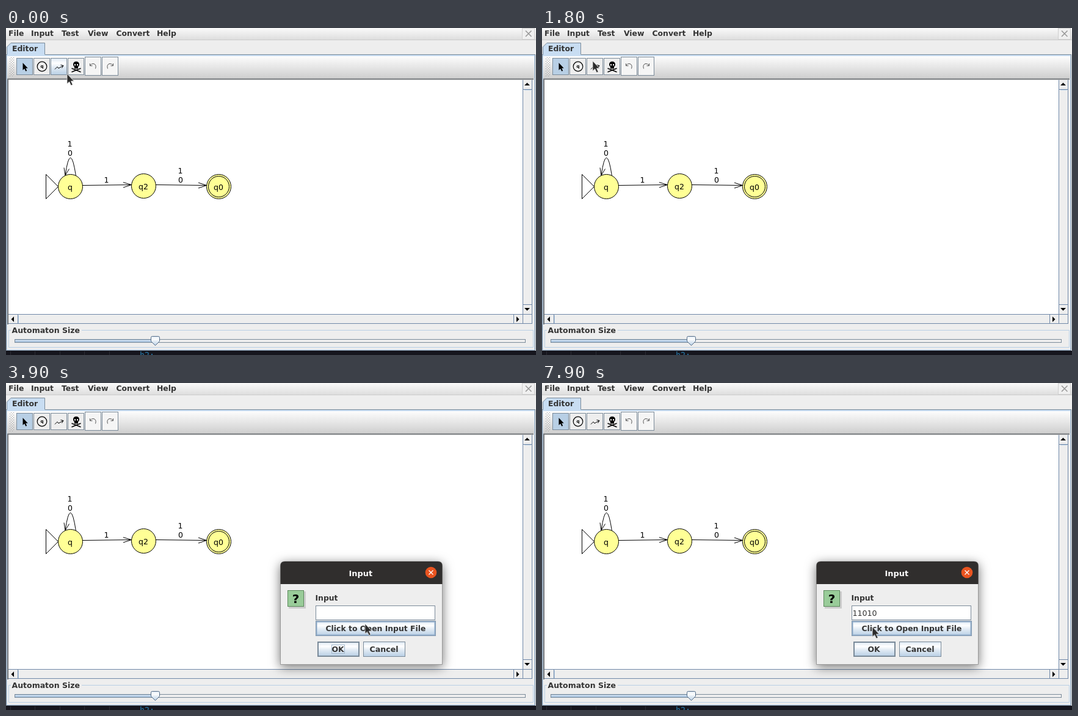
Recreate the animation shown at these times as an HTML page. Size 868 by 535 pixels, loop 8000 ms.

```html
<!DOCTYPE html>
<html lang="en">
<head>
<meta charset="utf-8">
<title>Automaton editor</title>
<style>
  html, body { margin: 0; width: 100%; height: 100%; overflow: hidden; background: #eee; }
  svg { display: block; width: 868px; height: 535px; }
  text { font: 12.5px "DejaVu Sans", sans-serif; fill: #000; white-space: pre; }
  .b text, text.b { font-weight: bold; font-size: 12.4px; fill: #333; }
  .dots text { font-size: 12.55px; }
  .key text { font-size: 10.15px; fill: #6382bf; }
  .mid text { text-anchor: middle; }
  .ln { fill: none; stroke: #000; }
  .edge { stroke: #7a8a99; }
  .scroll { fill: none; stroke: #7088a8; }
</style>
</head>
<body>
<svg viewBox="0 0 868 535" xmlns="http://www.w3.org/2000/svg">
  <defs>
    <linearGradient id="bar" x2="0" y2="1">
      <stop offset="0" stop-color="#fafafa"/><stop offset="1" stop-color="#dcdcdc"/>
    </linearGradient>
    <linearGradient id="tools" x2="0" y2="1">
      <stop offset="0" stop-color="#fdfdfd"/><stop offset="1" stop-color="#cfcfcf"/>
    </linearGradient>
    <linearGradient id="metal" x2="0" y2="1">
      <stop offset="0" stop-color="#dde8f3"/><stop offset=".3" stop-color="#fff"/>
      <stop offset=".55" stop-color="#e2ebf4"/><stop offset="1" stop-color="#b8cfe5"/>
    </linearGradient>
    <pattern id="grip" width="4" height="4" patternUnits="userSpaceOnUse">
      <path d="M0 0h1v1h-1zM2 2h1v1h-1z" fill="#999"/>
    </pattern>
    <path id="arrow" d="M0 0V16.300L3.700 12.900L6.500 19L9.200 17.800L6.500 11.900H11.300Z"/>
  </defs>

  <!-- menu bar and tab -->
  <rect width="868" height="535" fill="#eee"/>
  <rect width="868" height="20" fill="url(#bar)"/>
  <path d="M0 19.500H868" stroke="#ccc"/>
  <rect x="845.500" y=".5" width="20" height="18" fill="#f0f0f0" stroke="#d0d0d0"/>
  <path d="M851 4.500L860.500 14M860.500 4.500L851 14" stroke="#999" stroke-width="1.600"/>
  <rect id="menuOn" x="36" width="48" height="20" fill="#a3b8cc"/>
  <g class="b">
    <text x="4" y="13">File</text><text x="41" y="13">Input</text><text x="91" y="13">Test</text>
    <text x="134" y="13">View</text><text x="180.500" y="13">Convert</text><text x="247" y="13">Help</text>
  </g>
  <rect x=".5" y="43.500" width="866" height="484" fill="#c8ddf2" class="edge"/>
  <path d="M1.500 46V31L8 24.500H63.500V46Z" fill="#c8ddf2"/>
  <path d="M1.500 44V31L8 24.500H63.500V43" fill="none" class="edge"/>
  <text class="b" x="10" y="38">Editor</text>
  <rect x="2" y="46" width="863" height="480" fill="#eee"/>

  <!-- tool bar -->
  <rect x="2" y="46" width="863" height="36" fill="url(#tools)"/>
  <rect x="5" y="48" width="9" height="31" fill="url(#grip)"/>
  <g class="edge" fill="#eee">
    <rect x="17.500" y="49.500" width="26" height="27" fill="#b8cfe5"/>
    <rect x="45.500" y="49.500" width="26" height="27"/>
    <rect id="tool" x="73.500" y="49.500" width="26" height="27"/>
    <rect x="101.500" y="49.500" width="26" height="27"/>
    <rect x="129.500" y="47.500" width="26" height="30" fill="#f5f5f5"/>
    <rect x="157.500" y="47.500" width="26" height="30" fill="#f5f5f5"/>
  </g>
  <use href="#arrow" transform="translate(27.500 57) scale(.73)"/>
  <circle cx="59" cy="63" r="7.800" class="ln" stroke-width="1.200"/>
  <text x="59" y="65" text-anchor="middle" style="font-size:7px;font-weight:bold">q</text>
  <path d="M80 67.500L84 63.500L86 66L94 61.500M89.500 60.500L94 61.500L91.500 65.500" class="ln"/>
  <path d="M107.500 66L122.500 72M122.500 66L107.500 72" class="ln" stroke-width="1.500"/>
  <path d="M110 59.500a5 4.800 0 0 1 10 0q0 3 -2 4v3h-6v-3q-2 -1 -2 -4z"/>
  <path d="M112 59h2v2.500h-2zM116 59h2v2.500h-2z" fill="#eee"/>
  <g class="ln" style="stroke:#555">
    <path d="M137.500 61.500Q140 57.500 144 58.500Q148.500 60.500 146.500 66.500M137.500 58V61.800H141.500"/>
    <path d="M175.500 61.500Q173 57.500 169 58.500Q164.500 60.500 166.500 66.500M175.500 58V61.800H171.500"/>
  </g>

  <!-- drawing area with scroll bars -->
  <rect x="2" y="82" width="862" height="403" fill="#eee"/>
  <path d="M2 83.500H864M3 83V485" stroke="#6f7276" stroke-width="2"/>
  <rect x="4" y="85" width="842" height="383" fill="#fff"/>
  <g class="scroll">
    <path d="M846.500 85V468.500M861.500 85V484M847 100.500H861M847 452.500H861M847 468.500H861"/>
    <path d="M4 468.500H847M4 483.500H862M19.500 469V483M831.500 469V483M846.500 469V483"/>
  </g>
  <path d="M849 101.500H860M20.500 470V483" stroke="#b8cfe5"/>
  <path d="M849 94L853.500 89.500L858 94ZM849 458L853.500 462.500L858 458ZM13 472L8.500 476.500L13 481ZM836 472L840.500 476.500L836 481Z"/>

  <!-- automaton -->
  <g class="ln">
    <path d="M65.500 239.500L85.500 259.500L65.500 279.500Z"/>
    <path d="M114.500 242Q105.500 183 97 241M95 228.500L97 241L103.500 230.500"/>
    <path d="M125 257.500L205.500 256.500M192 252.500L205.500 256.500L192 261"/>
    <path d="M245 256.500L328.500 257.500M315 253L328.500 257.500L315 262"/>
  </g>
  <g fill="#ffff96" stroke="#000">
    <circle cx="105.500" cy="259.500" r="20"/><circle cx="225.500" cy="258.500" r="20"/>
    <circle cx="348.500" cy="259.500" r="20"/><circle cx="348.500" cy="259.500" r="17"/>
  </g>
  <g class="mid">
    <text x="105" y="265">q</text><text x="225" y="264">q2</text><text x="348" y="265">q0</text>
    <text x="104.500" y="194">1</text><text x="105" y="209">0</text><text x="164.500" y="253">1</text>
    <text x="285.500" y="238">1</text><text x="286" y="253">0</text>
  </g>

  <!-- size slider -->
  <path d="M8 494.500H4.500V522.500H863.500V494.500H124" fill="none" stroke="#b8cfe5"/>
  <text class="b" x="9.500" y="499" style="font-size:12.500px">Automaton Size</text>
  <rect x="14.500" y="509.500" width="836" height="5" fill="#eee" class="edge"/>
  <rect x="15" y="510" width="225" height="4" fill="#a9c3df"/>
  <path d="M15 511.500H240" stroke="#e0ebf6"/>
  <path d="M237.500 506.500Q237.500 504.500 239.500 504.500H249.500Q251.500 504.500 251.500 506.500V512.500L244.500 519.500L237.500 512.500Z" fill="url(#metal)" stroke="#536b87"/>
  <rect y="528" width="868" height="7" fill="#15151d"/>
  <path d="M7.500 529V535M47.500 529V535M88.500 529V535M128.500 529V535M169.500 529V535" stroke="#2a2b33"/>
  <text x="219" y="540" style="font:13.300px 'DejaVu Sans Mono',monospace;fill:#2878a8">h2:</text>

  <!-- drop-down menu -->
  <g id="menu">
    <rect x="36.500" y="20.500" width="234" height="80" fill="#eee" stroke="#6382bf"/>
    <rect id="item" x="37" width="233" height="19" fill="#a3b8cc"/>
    <g class="b dots">
      <text x="43" y="37">Step with Closure...</text><text x="43" y="56">Step by State...</text>
      <text x="42.500" y="75">Fast Run...</text><text x="42" y="94">Multiple Run</text>
    </g>
    <g class="key">
      <text x="188.500" y="36">Meta-R</text><text x="188.500" y="55">Meta+Shift-R</text><text x="188.500" y="93">Meta-M</text>
    </g>
  </g>

  <!-- dialog -->
  <g id="dialog">
    <path d="M449.500 460.500V299Q449.500 292 456.500 292H707.500Q714.500 292 714.500 299V460.500Z" fill="#eee" stroke="#999" style="filter:drop-shadow(0 4px 9px rgba(0,0,0,.55))"/>
    <path d="M449.500 329V299Q449.500 292 456.500 292H707.500Q714.500 292 714.500 299V329Z" fill="#302e2d"/>
    <text class="b" x="561.500" y="315.500" style="fill:#fff;font-size:12.900px">Input</text>
    <circle cx="696" cy="310" r="9.300" fill="#e95420"/>
    <path d="M692.500 306.500L699.500 313.500M699.500 306.500L692.500 313.500" stroke="#fff" stroke-width="1.300"/>
    <rect x="463" y="341" width="28" height="28" fill="#ccc"/>
    <rect x="461.500" y="339.500" width="26" height="26" fill="#99cc99" stroke="#5c8a5c"/>
    <text x="474.500" y="360" text-anchor="middle" style="font-weight:bold;font-size:20px">?</text>
    <text class="b" x="506.500" y="356">Input</text>
    <rect x="507.500" y="364.500" width="195" height="23" fill="#fff" class="edge"/>
    <text id="typed" x="508.500" y="381" style="fill:#333;font-size:12.600px"></text>
    <path id="caret" d="M.5 369V384" stroke="#333"/>
    <g fill="url(#metal)" class="edge">
      <rect x="507.500" y="389.500" width="196" height="24"/>
      <rect x="511" y="424" width="67" height="23" stroke-width="2"/>
      <rect x="585.500" y="423.500" width="68" height="24"/>
    </g>
    <rect id="hover" x="508.500" y="390.500" width="194" height="22" fill="none" stroke="#8fabc9" stroke-width="2"/>
    <rect id="focus" x="533.500" y="428.500" width="21" height="14" fill="none" stroke="#a3b8cc"/>
    <g class="b">
      <text x="523.500" y="406">Click to Open Input File</text>
      <text x="533.500" y="440">OK</text><text x="595.500" y="440" style="font-size:12.600px">Cancel</text>
    </g>
  </g>

  <use id="pointer" href="#arrow" fill="#2b2b2b" stroke="#e8e8e8" stroke-width=".8"/>
  <path id="beam" d="M-3 -6.500H-1L0 -5.500L1 -6.500H3M0 -5.500V5.500M-3 6.500H-1L0 5.500L1 6.500H3M-2 1.500H2" class="ln" stroke-width="1.200"/>
</svg>
<script>
  const LOOP = 8000, STEP = 100;
  const $ = id => document.getElementById(id);
  const show = (id, on) => $(id).setAttribute('visibility', on ? 'inherit' : 'hidden');
  const move = (id, x, y) => $(id).setAttribute('transform', `translate(${x} ${y})`);

  // pointer stops: time, x, y
  const path = [
    [0, 100, 75], [400, 78, 3], [1000, 78, 3], [1400, 83, 54], [3300, 83, 54],
    [3400, 342, 202], [3600, 590, 311], [3700, 590, 311], [3800, 592, 304],
    [3900, 588, 394], [4000, 588, 394], [4400, 545, 378], [7600, 545, 378],
    [7700, 583, 377], [7800, 583, 377], [7900, 541, 399], [LOOP, 541, 399]
  ];
  const word = '11010', keyTimes = [5300, 5400, 5900, 6500, 6900];

  function pointerAt(t) {
    const i = path.findIndex(p => p[0] > t);
    const [t0, x0, y0] = path[i - 1], [t1, x1, y1] = path[i];
    const k = (t - t0) / (t1 - t0);
    return [x0 + (x1 - x0) * k, y0 + (y1 - y0) * k];
  }

  function draw(now) {
    const t = Math.floor(now % LOOP / STEP) * STEP;
    const within = (a, b) => t >= a && t < b;
    const [x, y] = pointerAt(t);

    const open = within(600, 1700);
    show('menuOn', open);
    show('menu', open);
    const row = Math.floor((y - 22) / 19);
    show('item', open && row >= 0);
    $('item').setAttribute('y', 23 + row * 19);
    $('tool').setAttribute('fill', t < 200 ? 'url(#metal)' : '#eee');

    const asked = t >= 1900;
    show('dialog', asked);
    const count = keyTimes.filter(k => t >= k).length;
    $('typed').textContent = word.slice(0, count);
    move('caret', 509 + count * 8, 0);
    show('caret', asked && (within(4600, 6300) || within(6500, 7700)));
    show('focus', asked && t < 4600);
    show('hover', within(3900, 4100) || t >= 7700 || (within(4100, 4400) && y > 389));

    const inField = within(4100, 7700) && y < 389;
    show('pointer', !inField);
    show('beam', inField);
    move('pointer', x, y);
    move('beam', x + .5, y + .5);
  }

  const start = performance.now();
  function tick() {
    draw(performance.now() - start);
    requestAnimationFrame(tick);
  }
  tick();
</script>
</body>
</html>
```
